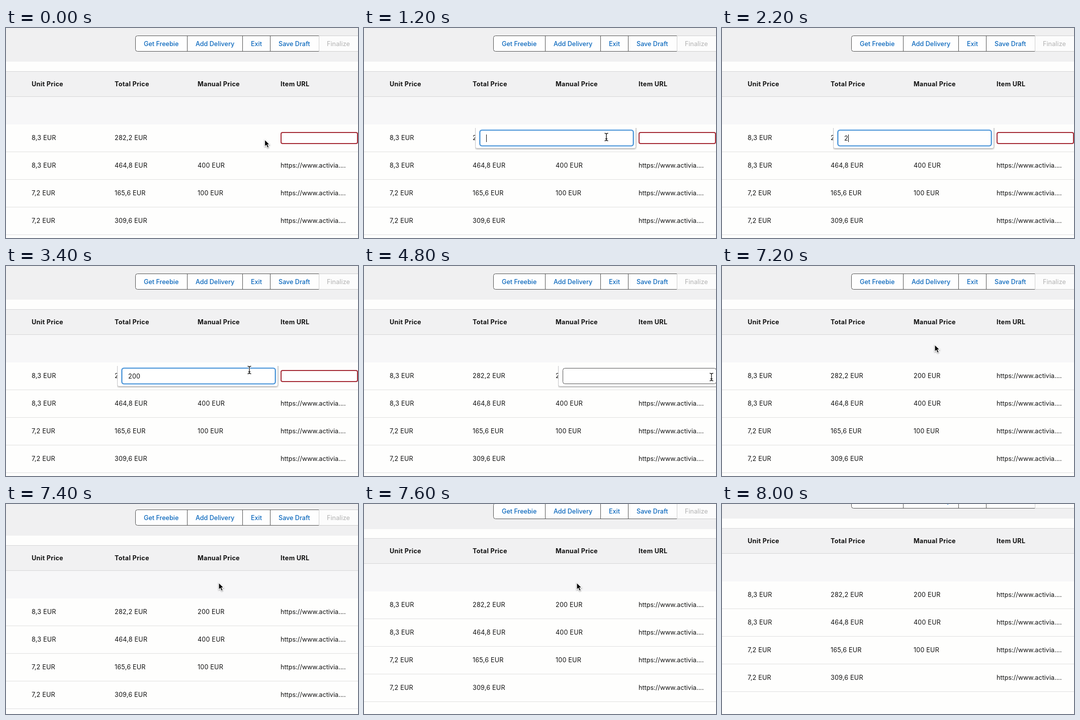
Animation, 700 px wide and 418 px high, one loop 8.4 s. Source, as an HTML page:

```html
<!DOCTYPE html>
<html lang="en">
<head>
<meta charset="utf-8">
<title>Price table editing</title>
<style>
  html, body { margin: 0; width: 100%; height: 100%; overflow: hidden; background: #fefefd; }
  svg { display: block; width: 700px; height: 418px; }
  text { font: 400 12.6px Inter, "Open Sans", sans-serif; letter-spacing: .2px; fill: #111; white-space: pre; }
  .head { font-weight: 700; letter-spacing: .32px; }
  .button { font-weight: 500; letter-spacing: 0; fill: #0b68bd; }
  .off { fill: #bcbcbc; }
  .url { letter-spacing: 0; }
  .rule { stroke: #e0e0e0; }
  .edge { stroke: #d6d6d8; }
  .frame { fill: #fefefe; stroke: #555; }
  #input { fill: #fff; stroke: #555; }
  #input.focus { stroke: #2a80cf; stroke-width: 1.7; filter: drop-shadow(0 0 1px #6eb2ee); }
  #panel { fill: #fff; stroke: #c3c3c5; filter: drop-shadow(0 1px 1.5px #0005); }
</style>
</head>
<body>
<svg viewBox="0 0 700 418">
  <defs>
    <clipPath id="below"><path d="M0 199H700V260H0z"/></clipPath>
    <path id="ibeam" d="M-3.5-7.5Q0-7.5 0-5.5Q0-7.5 3.5-7.5M0-5.5V5.5M-3.5 7.5Q0 7.5 0 5.5Q0 7.5 3.5 7.5M-2 3.5H2"/>
  </defs>
  <g id="bar">
    <rect width="700" height="67" fill="#f0f0f1"/>
    <path class="frame" d="M622.5 15.5H261.5a4 4 0 0 0-4 4V42.5a4 4 0 0 0 4 4H622.5"/>
    <path d="M622.5 15.5H710V46.5H622.5z" fill="#fcfcfc" stroke="#cfcfcf"/>
    <path d="M360.5 16V46M470.5 16V46M525.5 16V46" stroke="#555"/>
  </g>
  <g id="page">
    <rect y="86" width="700" height="51" fill="#f1f1f2"/>
    <path class="edge" d="M0 86.5H700M0 136.5H700"/>
    <rect y="137" width="700" height="55" fill="#f7f7f8"/>
    <g id="table"></g>
    <rect id="empty" x="547" y="208" width="152" height="22" rx="3" fill="#fff" stroke="#a62d38" stroke-width="2"/>
    <g id="popup">
      <g clip-path="url(#below)">
        <path id="panel" d="M.5 190H319.5V236.5a3 3 0 0 1-3 3H3.5a3 3 0 0 1-3-3z"/>
      </g>
      <rect id="input" x="9.5" y="203.5" width="305" height="31" rx="4"/>
      <text id="value" x="22" y="224"></text>
      <path id="caret" d="M0 212V227" stroke="#111"/>
    </g>
  </g>
  <g id="arrow">
    <path d="M0 0V14.2L3.2 11.2 5.5 16.5 8.3 15.3 6 10.2H10.3z" fill="#000" stroke="#fff" stroke-width="1.2" style="filter:drop-shadow(0 1px 1px #0006)"/>
  </g>
  <g id="beam" fill="none">
    <use href="#ibeam" stroke="#fff" stroke-width="3"/>
    <use href="#ibeam" stroke="#111" stroke-width="1.3"/>
  </g>
</svg>
<script>
const LOOP = 8400;
const $ = id => document.getElementById(id);

function add(parent, tag, attrs, text = '') {
  const el = document.createElementNS('http://www.w3.org/2000/svg', tag);
  for (const key in attrs) el.setAttribute(key, attrs[key]);
  el.textContent = text;
  parent.append(el);
  return el;
}

const link = 'https://www.activia....';
const longLink = 'https://www.activia.com/en/products/yogurt';
const columns = [51, 216, 381, 546];
const rows = [
  ['8,3 EUR', '282,2 EUR', '200 EUR', link],
  ['8,3 EUR', '464,8 EUR', '400 EUR', link],
  ['7,2 EUR', '165,6 EUR', '100 EUR', link],
  ['7,2 EUR', '309,6 EUR', '', link]
];

[['Get Freebie', 274], ['Add Delivery', 377], ['Exit', 487], ['Save Draft', 542], ['Finalize', 638]]
  .forEach(([label, x], i) => add($('bar'), 'text', { x, y: 36, class: i < 4 ? 'button' : 'button off' }, label));

['Unit Price', 'Total Price', 'Manual Price', 'Item URL']
  .forEach((label, i) => add($('table'), 'text', { x: columns[i], y: 116, class: 'head' }, label));

const cells = rows.map((row, r) => {
  const y = 223 + 55 * r;
  add($('table'), 'path', { class: 'rule', d: `M0 ${y + 23.5}H700` });
  return row.map((label, c) => add($('table'), 'text', { x: columns[c], y, class: c === 3 ? 'url' : '' }, label));
});
const [, , price, itemUrl] = cells[0];

// Each step lists only what differs from the one before it.
const steps = [
  [0, { arrow: [514.5, 222], beam: null, popup: null, focus: false, value: '', caret: false, priced: false, linked: false, scroll: 0 }],
  [200, { arrow: [496, 218] }],
  [400, { arrow: [482, 214] }],
  [800, { arrow: null, beam: [482, 215], popup: 221 }],
  [1000, { beam: [482, 217] }],
  [1200, { focus: true, caret: true }],
  [1400, { beam: [483, 215] }],
  [1600, { beam: [484, 212] }],
  [1800, { beam: null, caret: false }],
  [2200, { value: '2', caret: true }],
  [2600, { value: '20' }],
  [2800, { value: '200' }],
  [3400, { beam: [484, 207], caret: false }],
  [3600, { beam: null, arrow: [490, 184], caret: true }],
  [3800, { arrow: [497, 168] }],
  [4000, { popup: null, focus: false, caret: false, value: '', priced: true }],
  [4200, { arrow: [550, 180] }],
  [4400, { arrow: [630, 204] }],
  [4600, { arrow: [684, 216] }],
  [4800, { arrow: null, beam: [691, 221], popup: 386 }],
  [5000, { focus: true, caret: true }],
  [5200, { beam: [690, 220] }],
  [5400, { caret: false }],
  [5600, { beam: null, caret: true }],
  [6200, { value: longLink }],
  [6600, { arrow: [596, 172], caret: false }],
  [6800, { arrow: [520, 162], popup: null, focus: false, value: '', linked: true }],
  [7000, { arrow: [452, 157] }],
  [7200, { arrow: [423, 156.5] }],
  [7400, { scroll: 4 }],
  [7600, { scroll: 17.5 }],
  [7800, { scroll: 32 }],
  [8000, { scroll: 38, arrow: null }]
];

const states = [];
steps.forEach(([time, change], i) => states.push({ ...states[i - 1], ...change, time }));

const show = (el, on) => el.setAttribute('display', on ? 'inline' : 'none');
const move = (el, x, y) => el.setAttribute('transform', `translate(${x} ${y})`);

function place(el, point) {
  show(el, point);
  if (point) move(el, ...point);
}

function draw(s) {
  // The toolbar and the table snap to whole pixels separately.
  move($('bar'), 0, -Math.floor(s.scroll));
  move($('page'), 0, -Math.ceil(s.scroll));
  place($('arrow'), s.arrow);
  place($('beam'), s.beam);
  place($('popup'), s.popup && [s.popup, 0]);
  show(price, s.priced);
  show(itemUrl, s.linked);
  show($('empty'), !s.linked);
  show($('caret'), s.caret);
  $('input').setAttribute('class', s.focus ? 'focus' : '');
  $('value').textContent = s.value;
  $('value').setAttribute('class', s.value === longLink ? 'url' : '');
  if (s.caret) move($('caret'), 22.5 + Math.round(s.value ? $('value').getComputedTextLength() : 0), 0);
}

const start = performance.now();
let current;

function tick() {
  const time = (performance.now() - start) % LOOP;
  const state = states.findLast(s => s.time <= time) || states[0];
  if (state !== current) draw(current = state);
  requestAnimationFrame(tick);
}
tick();
</script>
</body>
</html>
```
